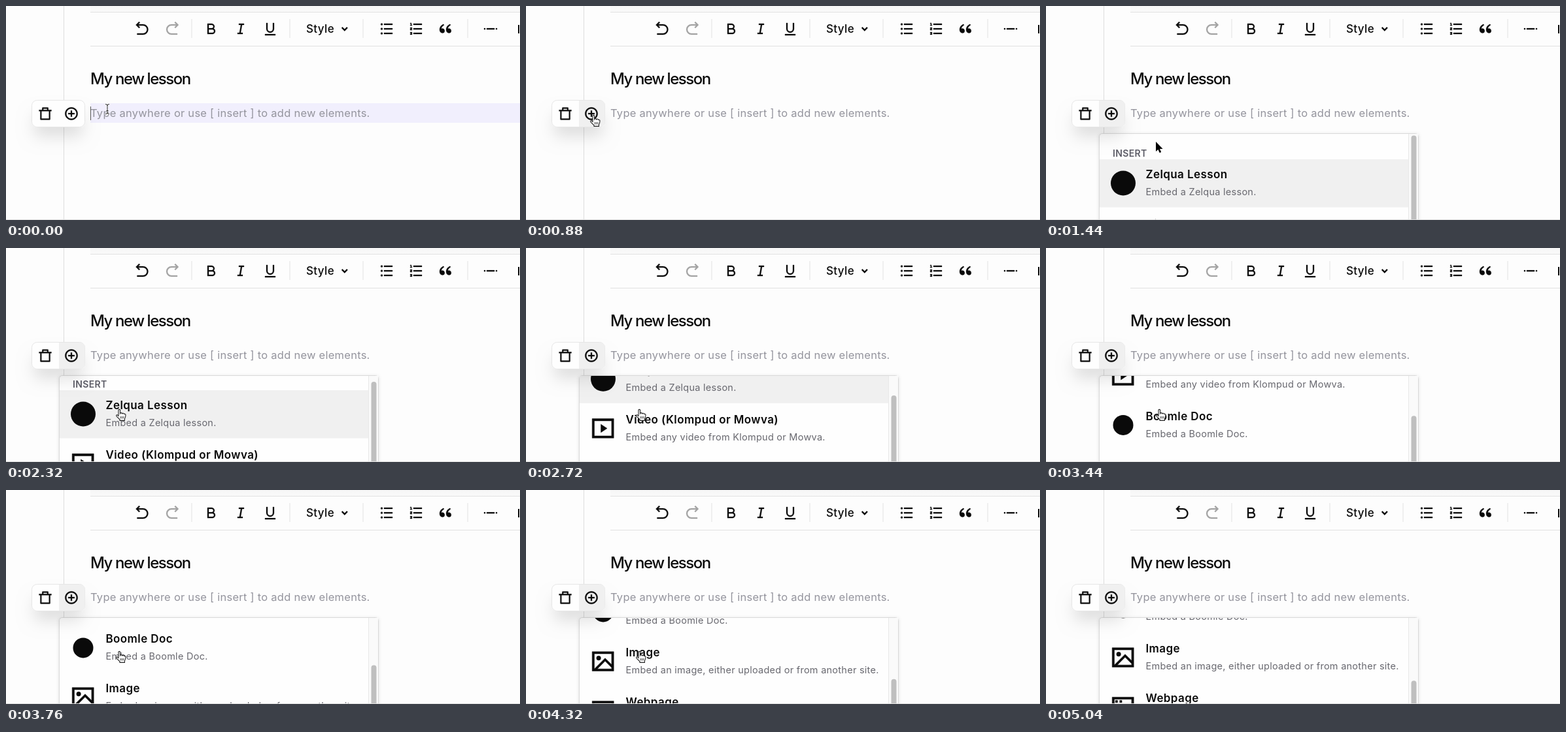
These frames come from a looping animation (786 px wide and 328 px high, 5.28 s). An HTML page with a canvas:

```html
<!DOCTYPE html>
<html lang="en">
<head>
<meta charset="utf-8">
<title>Lesson editor</title>
<style>
html, body { margin: 0; width: 100%; height: 100%; overflow: hidden; background: #fdfdfd; }
canvas { display: block; width: 786px; height: 328px; }
</style>
</head>
<body>
<canvas id="stage"></canvas>
<script>
const W = 786, H = 328, LOOP = 5280, STEP = 80;
const FONT = 'Inter, "Liberation Sans", sans-serif';
const INK = '#0a0a0a', LINE = '#e1e1e1';
const canvas = document.getElementById('stage');
const ctx = canvas.getContext('2d');
const dpr = window.devicePixelRatio || 1;
canvas.width = W * dpr;
canvas.height = H * dpr;

const quote = x => `M${x + 4.583} 17.321c-1.03-1.094-1.583-2.321-1.583-4.31 0-3.5 2.457-6.637 6.03-8.188l.893 1.378c-3.335 1.804-3.987 4.145-4.247 5.621.537-.278 1.24-.375 1.929-.311 1.804.167 3.226 1.648 3.226 3.489a3.5 3.5 0 0 1-3.5 3.5c-1.073 0-2.099-.49-2.748-1.179z`;
const bars = 'M8 4h13v2H8zM8 11h13v2H8zM8 18h13v2H8z';
const dot = y => `M4.5 ${y + 1.5}a1.5 1.5 0 1 1 0-3 1.5 1.5 0 0 1 0 3z`;

// Icons on a 24 unit grid
const icons = {
  undo: 'M5.828 7l2.536 2.536L6.95 10.95 2 6l4.95-4.95 1.414 1.414L5.828 5H13a8 8 0 1 1 0 16H4v-2h9a6 6 0 1 0 0-12H5.828z',
  bold: 'M8 11h4.5a2.5 2.5 0 1 0 0-5H8v5zm10 4.5a4.5 4.5 0 0 1-4.5 4.5H6V4h6.5a4.5 4.5 0 0 1 3.256 7.606A4.498 4.498 0 0 1 18 15.5zM8 13v5h5.5a2.5 2.5 0 1 0 0-5H8z',
  italic: 'M15 20H7v-2h2.927l2.116-12H9V4h8v2h-2.927l-2.116 12H15z',
  underline: 'M8 3v9a4 4 0 1 0 8 0V3h2v9a6 6 0 1 1-12 0V3h2zM4 20h16v2H4v-2z',
  bullets: bars + dot(5) + dot(12) + dot(19),
  numbers: bars + 'M5 3v3h1v1H3V6h1V4H3V3h2zM3 14v-2.5h2V11H3v-1h3v2.5H4v.5h2v1H3zM5 19.5H3v-1h2V18H3v-1h3v4H3v-1h2v-.5z',
  quote: quote(0) + quote(10),
  divider: 'M2 11h2v2H2zM6 11h12v2H6zM20 11h2v2h-2z',
  trash: 'M17 6h5v2h-2v13a1 1 0 0 1-1 1H5a1 1 0 0 1-1-1V8H2V6h5V3a1 1 0 0 1 1-1h8a1 1 0 0 1 1 1v3zm1 2H6v12h12V8zM9 4v2h6V4H9z',
  plus: 'M11 11V7h2v4h4v2h-4v4h-2v-4H7v-2h4zm1 11C6.477 22 2 17.523 2 12S6.477 2 12 2s10 4.477 10 10-4.477 10-10 10zm0-2a8 8 0 1 0 0-16 8 8 0 0 0 0 16z',
  video: 'M2 3h20v18H2zM4 5v14h16V5zM10.1 8.2l5.7 3.8-5.7 3.8z',
  image: 'M2 3h20v18H2zM20 15V5H4v14L14 9l6 6zm0 2.828l-6-6L6.828 19H20v-1.172zM8 11a2 2 0 1 1 0-4 2 2 0 0 1 0 4z',
  page: 'M2 3h20v18H2zM4 11v8h16v-8zM4 5v4h16V5zM5 6h2v2H5zM9 6h2v2H9z'
};
for (const name in icons) icons[name] = new Path2D(icons[name]);

const arrow = new Path2D('M0 0V15L3.4 11.9L5.7 17L8.2 15.9L6 10.9H10.6Z');
const hand = new Path2D('M4 1.6C4 0 6.6 0 6.6 1.6V6.4C7.2 5.2 9.4 5.4 9.6 6.8C10.4 5.8 12.3 6.2 12.5 7.5C13.6 6.9 15 7.6 15 9C15 12 14.6 13 13.4 15V17.4H6V15.8L1 10.8C0 9.2 1.8 8.2 3 9.4L4 10.4Z');
const knuckles = new Path2D('M7.4 11V14.4M9.6 11V14.4M11.8 11V14.4');

const items = [
  ['Zelqua Lesson', 'Embed a Zelqua lesson.'],
  ['Video (Klompud or Mowva)', 'Embed any video from Klompud or Mowva.', 'video'],
  ['Boomle Doc', 'Embed a Boomle Doc.'],
  ['Image', 'Embed an image, either uploaded or from another site.', 'image'],
  ['Webpage', '', 'page']
];

// Time, then value
const scrollKeys = [[2160, 0], [2240, 5], [2320, 17], [2480, 40], [3120, 122], [3760, 181], [4320, 236], [4480, 242]];
const menuKeys = [[1000, 0], [1200, 1]];
const xKeys = [[0, 155], [80, 150], [240, 128], [400, 108], [520, 103], [1160, 103], [1280, 130], [1360, 156], [1440, 168], [1680, 168], [1840, 173]];
const yKeys = [[0, 158], [240, 163], [520, 168], [1160, 168], [1280, 188], [1440, 208], [1680, 219], [1840, 248]];
const CLICK = 640, HIDE = 4800;

function track(keys, t) {
  if (t <= keys[0][0]) return keys[0][1];
  for (let i = 1; i < keys.length; i++) {
    const [t0, a] = keys[i - 1], [t1, b] = keys[i];
    if (t < t1) return a + (b - a) * (t - t0) / (t1 - t0);
  }
  return keys[keys.length - 1][1];
}

function rect(x, y, w, h, color) {
  ctx.fillStyle = color;
  ctx.fillRect(x, y, w, h);
}

function round(x, y, w, h, r, color) {
  ctx.beginPath();
  ctx.roundRect(x, y, w, h, r);
  ctx.fillStyle = color;
  ctx.fill();
}

// The shadow is cast by the card shrunk by `inset`
function card(x, y, w, h, r, shadow, blur, drop, inset, border) {
  ctx.save();
  ctx.shadowColor = shadow;
  ctx.shadowBlur = blur * dpr;
  ctx.shadowOffsetY = drop * dpr;
  round(x + inset, y + inset, w - 2 * inset, h - 2 * inset, r, '#fff');
  ctx.restore();
  round(x, y, w, h, r, '#fefefe');
  ctx.beginPath();
  ctx.roundRect(x + .5, y + .5, w - 1, h - 1, r);
  ctx.strokeStyle = border;
  ctx.lineWidth = 1;
  ctx.stroke();
}

function text(str, x, y, size, weight, color, spacing) {
  ctx.font = `${weight} ${size}px ${FONT}`;
  ctx.letterSpacing = spacing + 'px';
  ctx.fillStyle = color;
  ctx.fillText(str, x, y);
}

function icon(name, x, y, scale = 1, color = INK, flip = 1) {
  ctx.save();
  ctx.translate(x, y);
  ctx.scale(scale * flip, scale);
  ctx.translate(-12, -12);
  ctx.fillStyle = ctx.strokeStyle = color;
  ctx.lineWidth = .3;
  ctx.fill(icons[name], 'evenodd');
  ctx.stroke(icons[name]);
  ctx.restore();
}

function drawToolbar() {
  const fade = ctx.createLinearGradient(0, 0, 0, 9);
  fade.addColorStop(0, '#f6f6f6');
  fade.addColorStop(1, '#fafafa');
  rect(129, 0, W - 129, 9, fade);
  rect(129, 9, W - 129, 1, LINE);
  rect(129, 61, W - 129, 1, LINE);
  for (const x of [284, 434, 546, 706]) rect(x - .5, 20, 1, 29, LINE);
  icon('undo', 208.5, 35);
  icon('undo', 254, 35, 1, '#a3a3a3', -1);
  icon('bold', 314, 35);
  icon('italic', 359, 35);
  icon('underline', 404, 35);
  text('Style', 459, 41, 17, 500, INK, .35);
  ctx.beginPath();
  ctx.moveTo(513.7, 32.9);
  ctx.lineTo(517.8, 37);
  ctx.lineTo(521.9, 32.9);
  ctx.strokeStyle = INK;
  ctx.lineWidth = 2.3;
  ctx.stroke();
  icon('bullets', 582, 35);
  icon('numbers', 627, 35);
  icon('quote', 672, 35);
  icon('divider', 741, 35);
  rect(783, 29, 2, 13, INK);
}

function drawRow(focused) {
  text('My new lesson', 129, 120, 24, 500, INK, -1.45);
  if (focused) rect(129, 149, W - 129, 30, '#f1effd');
  text('Type anywhere or use [ insert ] to add new elements.', 129, 170, 16.5, 400, '#94949d', .25);
  if (focused) rect(129, 154, 1, 21, '#555');
}

function drawTools(active) {
  card(39, 144, 82, 42, 8, 'rgba(0,0,0,.12)', 25, 18, 4, '#e6e6e6');
  if (active) round(81, 145, 39.5, 40, [0, 7, 7, 0], '#f0f0f0');
  icon('trash', 60, 165, .95);
  icon('plus', 100, 165, .97);
}

function drawItem([title, note, name], i, y) {
  if (i === 0) rect(82, y - 23, 472.5, 73.5, '#f0f0f0');
  if (name) {
    icon(name, 117.7, y + 13.5, 1.65);
  } else {
    ctx.beginPath();
    ctx.arc(118, y + 13.5, i ? 15.5 : 19, 0, Math.PI * 2);
    ctx.fillStyle = INK;
    ctx.fill();
  }
  text(title, 152.5, y + 6, 17, 600, INK, .4);
  text(note, 152.5, y + 32, 14.5, 400, '#68686f', .26);
}

function drawMenu(alpha, scroll) {
  if (!alpha) return;
  ctx.save();
  ctx.globalAlpha = alpha;
  card(81, 195, 489, 160, 4, 'rgba(0,0,0,.12)', 4, 1, 0, '#dadada');
  rect(554.5, 196, 14.5, H - 196, '#fafafa');
  rect(554, 196, 1, H - 196, '#e8e8e8');
  round(558.5, 198.5 + scroll * .387, 8, 180, 4, '#bfbfbf');
  ctx.beginPath();
  ctx.rect(82, 196, 472, H - 196);
  ctx.clip();
  text('INSERT', 102, 230.5 - scroll, 14, 600, '#5c5c66', .35);
  items.forEach((item, i) => drawItem(item, i, 258 + i * 75.7 - scroll));
  ctx.restore();
}

function drawBeam() {
  const shape = new Path2D('M-3 -7.5Q0 -7.5 0 -5.5Q0 -7.5 3 -7.5M0 -5.5V5.5M-3 7.5Q0 7.5 0 5.5Q0 7.5 3 7.5M-1.5 2.5H1.5');
  ctx.strokeStyle = '#fff';
  ctx.lineWidth = 2.4;
  ctx.stroke(shape);
  ctx.strokeStyle = '#222';
  ctx.lineWidth = 1;
  ctx.stroke(shape);
}

function drawArrow() {
  ctx.strokeStyle = '#fff';
  ctx.lineWidth = 2;
  ctx.stroke(arrow);
  ctx.fillStyle = '#000';
  ctx.fill(arrow);
}

function drawHand() {
  ctx.translate(-5, -1);
  ctx.fillStyle = '#fff';
  ctx.fill(hand);
  ctx.strokeStyle = '#222';
  ctx.lineWidth = 1.1;
  ctx.stroke(hand);
  ctx.lineWidth = .9;
  ctx.stroke(knuckles);
}

function drawPointer(t, x, y) {
  if (t >= HIDE) return;
  ctx.save();
  ctx.translate(x, y);
  const onTools = x < 121 && y < 186;
  if (onTools || y >= 235) drawHand();
  else if (t < CLICK) drawBeam();
  else drawArrow();
  ctx.restore();
}

function draw(t) {
  const x = track(xKeys, t), y = track(yKeys, t);
  ctx.setTransform(dpr, 0, 0, dpr, 0, 0);
  rect(0, 0, W, H, '#fdfdfd');
  rect(88, 0, 1, H, '#dedede');
  drawToolbar();
  drawRow(t < CLICK);
  drawMenu(track(menuKeys, t), track(scrollKeys, t));
  drawTools(t >= CLICK || x < 121);
  rect(0, 327, W, 1, '#dcdcdc');
  drawPointer(t, x, y);
}

const start = performance.now();
function tick() {
  const t = (performance.now() - start) % LOOP;
  draw(Math.floor(t / STEP) * STEP);
  requestAnimationFrame(tick);
}
tick();
</script>
</body>
</html>
```
